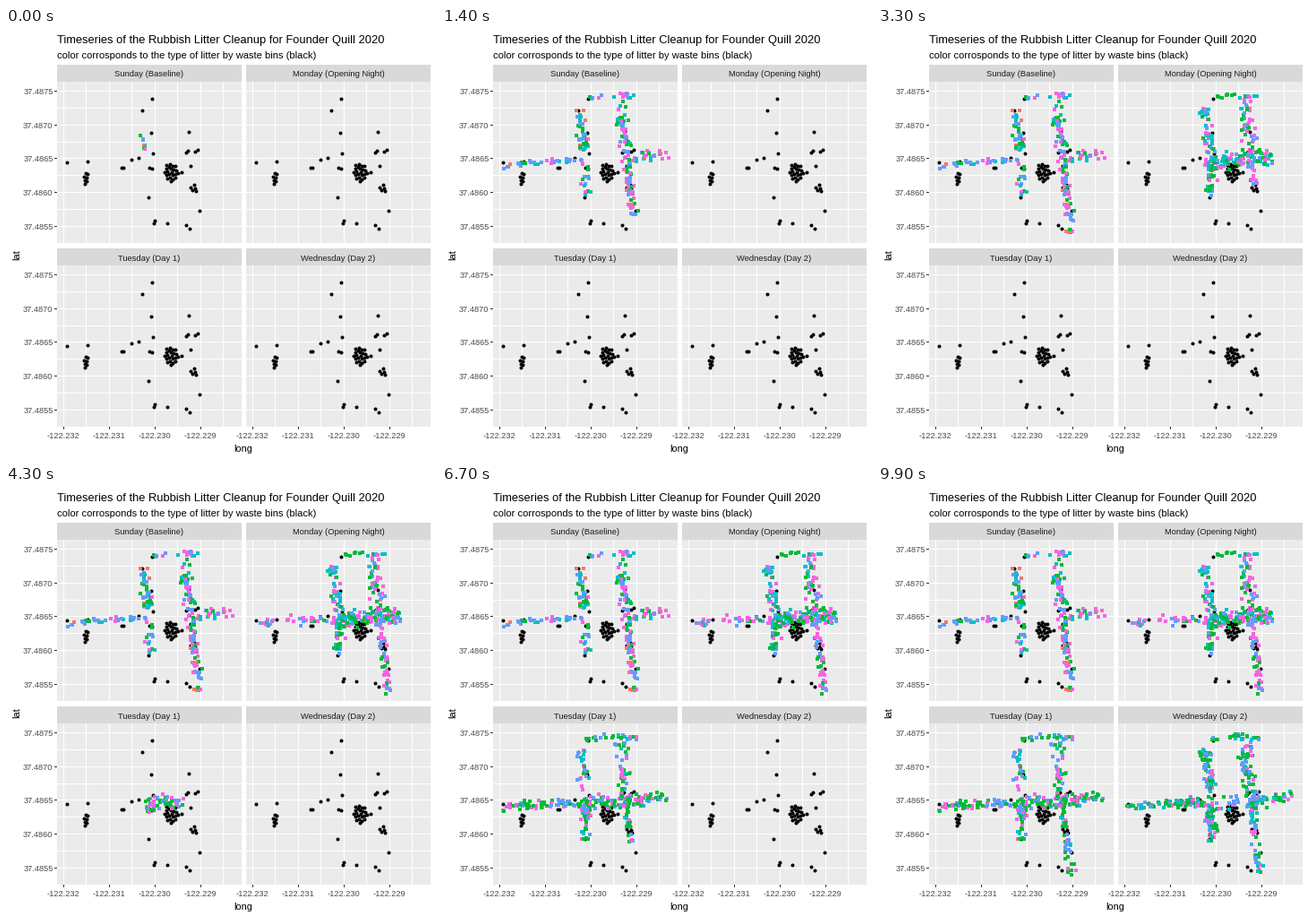
Animation of 480 by 480 pixels, one loop 10 s. Source, as a matplotlib script:

```python
from itertools import groupby

import numpy as np
import matplotlib.pyplot as plt
from matplotlib.animation import FuncAnimation
from matplotlib.patches import Rectangle

SIZE, FRAMES, INTERVAL = 480, 100, 100
COLORS = dict(r="#F8766D", g="#00BA38", t="#00BFC4", b="#619CFF", p="#F564E3")
LEFT, TOP = 57, 60
PANEL_W, PANEL_H, STRIP_H = 206, 180, 19
SHIFT = np.array([211, 205])

plt.rcParams["font.family"] = "Liberation Sans"

# Streets as (spread, key points), in the first panel's pixels
STREETS = dict(
    h=(1.5, [(151, 121), (158, 136)]),
    a=(2.5, [(157, 149), (115, 150), (68, 153)]),
    n=(3, [(160, 137), (158, 115), (153, 90)]),
    s=(3, [(161, 152), (161, 189)]),
    t=(1.5, [(158, 79), (188, 75), (217, 77)]),
    r=(4, [(200, 82), (201, 110), (206, 138)]),
    m=(4, [(156, 152), (180, 147), (226, 146)]),
    e=(2.5, [(203, 146), (250, 141)]),
    d=(2.5, [(206, 150), (210, 185), (216, 230)]),
)

# Title, route (one letter is one step on that street), pieces per step, litter mix
DAYS = [
    ("Sunday (Baseline)", "hsaanntrrreedddd", 16, "gggttbbbppr"),
    ("Monday (Opening Night)", "mmmmmmmmssnnntrrrdddaamm", 15, "gggttbbppp"),
    ("Tuesday (Day 1)", "mmmmmmmeeeaaaaaasssnnttrrrdddd", 12, "ggggtbbpp"),
    ("Wednesday (Day 2)", "aaaassssaannnttddddrrrreeennmm", 13, "gggttbbp"),
]

LONE_BINS = [
    (163, 79), (152, 92), (162, 117), (204, 116), (164, 140), (148, 145), (140, 147),
    (129, 156), (131, 156), (160, 156), (163, 157), (68, 150), (91, 149), (159, 189),
    (166, 215), (165, 218), (180, 218), (201, 220), (205, 224), (216, 204), (201, 139),
    (203, 137), (211, 138), (214, 136), (206, 154), (196, 161),
]


def sunflower(x, y, rx, ry, n):
    """Evenly filled ellipse of n points."""
    i = np.arange(n)
    r, angle = np.sqrt((i + 0.5) / n), i * np.pi * (3 - 5 ** 0.5)
    return np.column_stack([x + rx * r * np.cos(angle), y + ry * r * np.sin(angle)])


def along(street, u):
    """Points at fractions u of the street's length."""
    pts = np.array(STREETS[street][1], float)
    dist = np.append(0, np.cumsum(np.hypot(*np.diff(pts, axis=0).T)))
    return np.column_stack([np.interp(u * dist[-1], dist, axis) for axis in pts.T])


def drop_litter(rng):
    """Follow every day's route; return times, positions and colours."""
    times, spots, hues = [], [], []
    step = 0
    for day, (_, route, pace, mix) in enumerate(DAYS):
        hue = mix[0]
        for street, run in groupby(route):
            steps = len(list(run))
            n = steps * (pace if step else pace // 2)
            u = np.sort(rng.random(n))
            jitter = rng.normal(0, STREETS[street][0], (n, 2))
            times.append(step - 1 + u * steps)
            spots.append(along(street, u) + jitter + SHIFT * [day % 2, day // 2])
            for _ in range(n):
                if rng.random() < 0.7:
                    hue = mix[rng.integers(len(mix))]
                hues.append(COLORS[hue])
            step += steps
    return np.concatenate(times), np.round(np.concatenate(spots)), np.array(hues)


def label(x, y, text, size, color="black", **kw):
    ax.text(x, y, text, fontsize=size, color=color, **kw)


def box(x, y, w, h, color):
    ax.add_patch(Rectangle((x, y), w, h, fc=color, lw=0, zorder=0))


def line(xs, ys, color):
    ax.plot(xs, ys, color=color, lw=1, zorder=1, solid_capstyle="butt", snap=False)


def draw_panel(col, row, title):
    x, y = np.array([LEFT, TOP]) + SHIFT * [col, row]
    right, bottom = x + PANEL_W, y + PANEL_H
    box(x, y - STRIP_H, PANEL_W, STRIP_H, "#D9D9D9")
    box(x, y, PANEL_W, PANEL_H, "#EBEBEB")
    label(x + PANEL_W / 2, y - 5.5, title, 9.4, "#1A1A1A", ha="center")
    for k in range(8):
        gx = int(x + 7.4 + 25.45 * k) + 0.5
        line([gx, gx], [y, bottom], "white")
        if row and k % 2 == 0:
            line([gx, gx], [bottom, bottom + 3], "#333333")
            label(gx - 0.5, bottom + 13, f"-122.{232 - k // 2}", 9.2, "#4D4D4D", ha="center")
    for k in range(9):
        gy = int(y + 10.4 + 18.87 * k) + 0.5
        line([x, right], [gy, gy], "white")
        if not col and k % 2 == 0:
            line([x - 3, x], [gy, gy], "#333333")
            label(x - 4.5, gy + 3.2, f"{37.4875 - k * 0.00025:.4f}", 9.2, "#4D4D4D", ha="right")
    spots = np.round(bins + SHIFT * [col, row])
    ax.scatter(*spots.T, s=16, c="black", lw=0, antialiased=False, zorder=2)


fig = plt.figure(figsize=(SIZE / 72, SIZE / 72), dpi=72, facecolor="white")
ax = fig.add_axes([0, 0, 1, 1])
ax.set(xlim=(0, SIZE), ylim=(SIZE, 0))
ax.set_autoscale_on(False)
ax.axis("off")

label(57, 17, "Timeseries of the Rubbish Litter Cleanup for Founder Quill 2020", 12.87)
label(57, 33.5, "color corrosponds to the type of litter by waste bins (black)", 11.1)
label(265, 473, "long", 11, ha="center")
label(12, 253, "lat", 11, rotation=90, ha="center", va="center")

bins = np.vstack([
    LONE_BINS,
    sunflower(184, 161, 8, 11, 22),
    sunflower(89, 167, 3, 8, 7),
    sunflower(210, 179, 4, 5, 5),
])
for i, day in enumerate(DAYS):
    draw_panel(i % 2, i // 2, day[0])

times, spots, hues = drop_litter(np.random.default_rng(7))
litter = ax.scatter([], [], s=16, lw=0, antialiased=False, zorder=3)


def update(frame):
    n = np.searchsorted(times, frame, side="right")
    litter.set_offsets(spots[:n])
    litter.set_facecolor(list(hues[:n]))
    return [litter]


anim = FuncAnimation(fig, update, frames=FRAMES, interval=INTERVAL, repeat=True, repeat_delay=0)
plt.show()
```
